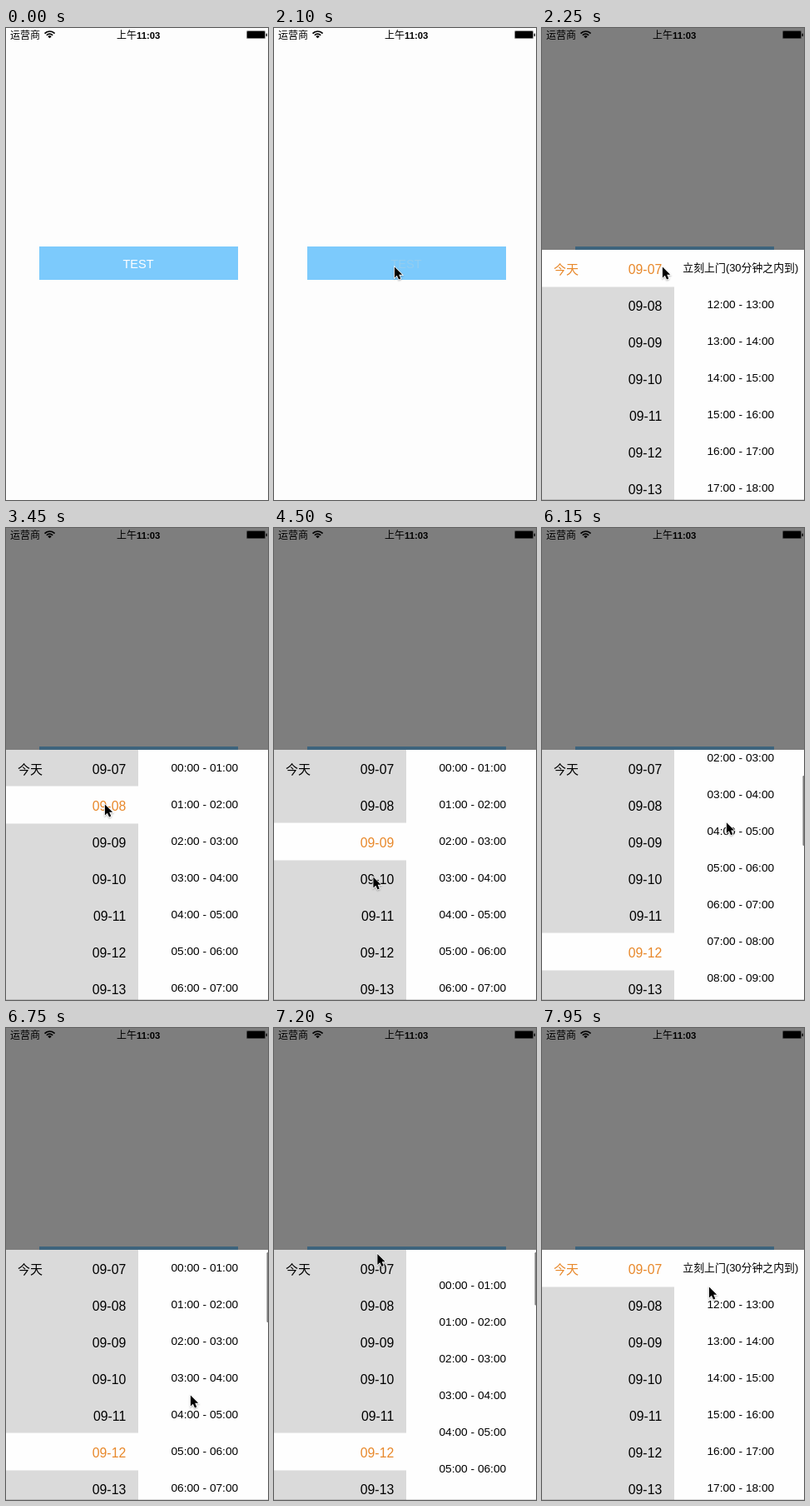
Recreate the animation shown at these times as an HTML page with a canvas. Size 315x566 px, loop 8000 ms.

```html
<!DOCTYPE html>
<html lang="zh">
<head>
<meta charset="utf-8">
<style>
  html, body { margin: 0; width: 100%; height: 100%; overflow: hidden; background: #fdfdfd; }
  canvas { display: block; }
</style>
</head>
<body>
<canvas id="stage" width="315" height="566"></canvas>
<script>
const ctx = document.getElementById('stage').getContext('2d');
const W = 315, H = 566, LOOP = 8000, STEP = 150;
const TOP = 266, ROW = 44, SPLIT = 159;
const FONT = '"Liberation Sans", "Noto Sans CJK SC", "Noto Sans CJK", sans-serif';

const APPEAR = 1200, PRESS = 2100, OPEN = 2250, DRAG = 5850, RELEASE = 6750, RETURN = 7500;
const DAY_CLICKS = [3300, 4050, 4800, 5100, 5400];  // each one selects the next day
const TRAVEL = 600;                                 // longest pointer move

// Places the pointer stops at, with arrival times
const STOPS = [
  { at: APPEAR, x: 279, y: 292 },
  { at: 1800, x: 144.5, y: 286 },
  { at: 3150, x: 118.5, y: 331 },
  { at: 4050, x: 118.5, y: 374 },
  { at: 4500, x: 119, y: 418 },
  { at: 5250, x: 126.5, y: 491.5 },
  { at: DRAG, x: 221.5, y: 440 },
  { at: 6300, x: 221.5, y: 322 },
  { at: RELEASE, x: 221.5, y: 440 },
  { at: 7200, x: 124, y: 270.5 },
  { at: 7950, x: 200.5, y: 310 }
];

const pad = n => String(n).padStart(2, '0');
const allHours = Array.from({ length: 24 }, (_, h) => `${pad(h)}:00 - ${pad(h + 1)}:00`);
const todaySlots = ['立刻上门(30分钟之内到)', ...allHours.slice(12)];

const clamp = v => Math.min(1, Math.max(0, v));
const ease = u => u * u * (3 - 2 * u);

function pointerAt(t) {
  const next = STOPS.findIndex(stop => stop.at > t);
  if (next < 0) return STOPS[STOPS.length - 1];
  const a = STOPS[next - 1], b = STOPS[next];
  const start = Math.max(a.at, b.at - TRAVEL);
  const u = ease(clamp((t - start) / (b.at - start)));
  return { x: a.x + (b.x - a.x) * u, y: a.y + (b.y - a.y) * u };
}

// The list follows the drag, then overshoots its top and springs back
function scrollAt(t) {
  if (t < DRAG || t >= RETURN) return 0;
  if (t < RELEASE) return 1.15 * (440 - pointerAt(t).y);
  return -21.5 * Math.sin(Math.PI * (t - RELEASE) / (RETURN - RELEASE));
}

const selectedAt = t => t >= RETURN ? 0 : DAY_CLICKS.filter(click => click <= t).length;

function rect(x, y, w, h, color) {
  ctx.fillStyle = color;
  ctx.fillRect(x, y, w, h);
}

function text(str, x, y, size, color, align = 'left', weight = 400) {
  ctx.font = `${weight} ${size}px ${FONT}`;
  ctx.textAlign = align;
  ctx.fillStyle = color;
  ctx.fillText(str, x, y);
}

function pill(x, y, w, h, r, color) {
  ctx.beginPath();
  ctx.roundRect(x, y, w, h, r);
  ctx.fillStyle = color;
  ctx.fill();
}

function wifiArc(r) {
  ctx.beginPath();
  ctx.arc(52.5, 12.2, r, -Math.PI * 0.76, -Math.PI * 0.24);
}

function drawStatusBar() {
  text('运营商', 5, 12.5, 12, '#000', 'left', 300);
  text('上午', 133, 12.5, 12, '#000', 'left', 500);
  text('11:03', 157, 12.5, 11.3, '#000', 'left', 700);

  ctx.strokeStyle = ctx.fillStyle = '#000';
  ctx.lineWidth = 1.7;
  for (const r of [5, 8.2]) {
    wifiArc(r);
    ctx.stroke();
  }
  wifiArc(3);
  ctx.lineTo(52.5, 12.2);
  ctx.fill();

  pill(289, 3, 23, 10, 1.5, 'rgba(0,0,0,0.45)');
  pill(290, 4, 21, 8, 0.8, '#000');
  pill(312.6, 6.5, 1.3, 3.5, 0.6, '#000');
}

function drawDays(selected) {
  rect(0, TOP, SPLIT, H - TOP, '#dadada');
  rect(0, TOP + ROW * selected - 0.5, SPLIT, ROW + 1, '#fefefe');
  for (let i = 0; i < 7; i++) {
    const color = i === selected ? '#e8882a' : '#000';
    const base = TOP + ROW * i + 28.5;
    if (i === 0) text('今天', 14, base, 15, color, 'left', 300);
    text(`09-${pad(7 + i)}`, 144.2, base, 15.8, color, 'right');
  }
}

function drawSlots(slots, offset) {
  slots.forEach((slot, i) => {
    const size = slots === todaySlots && i === 0 ? 12.9 : 13.7;
    text(slot, 238.8, TOP + ROW * i - offset + 26.3, size, '#000', 'center');
  });
}

function drawIndicator(t, offset) {
  if (t < DRAG || t >= 7950) return;
  const y = TOP + 3 + Math.max(0, offset) * 294 / (24 * ROW);
  pill(313.5, y, 2.5, 84 + Math.min(0, offset), 1.2, `rgba(0,0,0,${t < 7800 ? 0.5 : 0.2})`);
}

function drawPanel(t) {
  const selected = selectedAt(t), offset = scrollAt(t);
  rect(0, 0, W, H, 'rgba(0,0,0,0.5)');
  ctx.save();
  ctx.beginPath();
  ctx.rect(0, TOP, W, H - TOP);
  ctx.clip();
  rect(0, TOP, W, H - TOP, '#fefefe');
  drawDays(selected);
  drawSlots(selected ? allHours : todaySlots, offset);
  drawIndicator(t, offset);
  rect(0, H - 1, W, 1, 'rgba(0,0,0,0.15)');
  ctx.restore();
}

const arrow = new Path2D('M0 0V14.2L3.3 11.2L5.7 16.6L8.2 15.5L5.9 10.3H10.3Z');

function drawPointer({ x, y }) {
  ctx.save();
  ctx.translate(x + 0.4, y + 0.6);
  ctx.scale(0.9, 0.9);
  ctx.shadowColor = 'rgba(0,0,0,0.3)';
  ctx.shadowBlur = 2;
  ctx.shadowOffsetY = 1;
  ctx.strokeStyle = '#fff';
  ctx.lineWidth = 1.8;
  ctx.stroke(arrow);
  ctx.shadowColor = 'transparent';
  ctx.fillStyle = '#000';
  ctx.fill(arrow);
  ctx.restore();
}

function draw(now) {
  const t = Math.floor(now % LOOP / STEP) * STEP;
  rect(0, 0, W, H, '#fdfdfd');
  rect(40, 262, 239, 40, '#7ccafc');
  text('TEST', 159, 287.8, 14.5, t < PRESS ? '#fff' : '#93cdf0', 'center');
  if (t >= OPEN) drawPanel(t);
  drawStatusBar();
  if (t >= APPEAR) drawPointer(pointerAt(t));
  requestAnimationFrame(draw);
}

requestAnimationFrame(draw);
</script>
</body>
</html>
```
